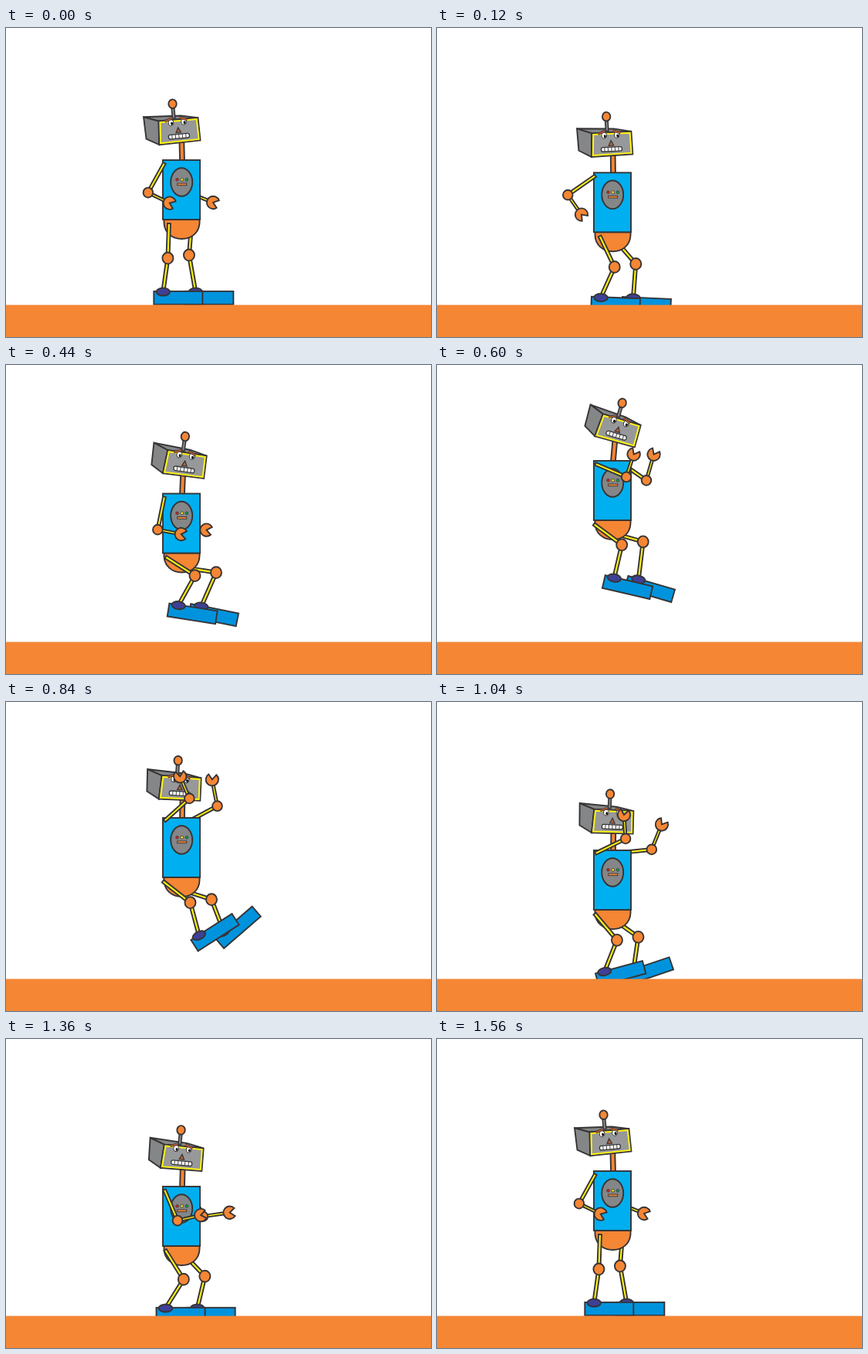
An HTML page that plays this animation: 550x400 px, repeating every 1.6 s.

```html
<!DOCTYPE html>
<html lang="en">
<head>
<meta charset="utf-8">
<title>Jumping robot</title>
<style>
html, body { margin: 0; width: 100%; height: 100%; overflow: hidden; background: #fff; }
svg { display: block; width: 550px; height: 400px; }
</style>
</head>
<body>
<svg viewBox="0 0 550 400" stroke="#373435" stroke-width="1.9">
  <g id="robot"></g>
  <rect y="358.5" width="550" height="42" fill="#f58634" stroke="none"/>
</svg>
<script>
const STEP = 40, COUNT = 40, FLOOR = 349;
const ORANGE = '#f58634', YELLOW = '#fff212', SHOE = '#0093dd', NAVY = '#3e4095', GREY = '#848688';
const rad = Math.PI / 180;

// Key poses; angles in degrees, pairs are upper and lower bone.
const poses = [
  { at: 0, head: 223.8, tilt: -5, hip: 211, leg: [92, 98], shoe: 0, arm: [119, 26], far: [95, 22] },
  { at: 7, head: 229.2, tilt: 0, hip: 210, leg: [28.5, 135], shoe: 5, arm: [180, 94], far: [186, 99] },
  { at: 15, head: 234.5, tilt: 16.5, hip: 203, leg: [36.5, 103], shoe: 13, arm: [23, -72], far: [35, -74] },
  { at: 21, head: 225.7, tilt: 3.5, hip: 203, leg: [38, 75], shoe: -32.7, arm: [-42, -113], far: [-28, -101] },
  { at: 26, head: 227.7, tilt: 2.5, hip: 204, leg: [50, 111.5], shoe: -15, arm: [-26, -94], far: [-6, -68] },
  { at: 34, head: 228.3, tilt: 5.5, hip: 206, leg: [58, 122], shoe: 0, arm: [67, -13], far: [66, -8] }];
poses.push({ ...poses[0], at: COUNT - 1 });

// Height of the torso top: crouch, leap, fall, crouch, rise
const lift = [[0, 171], [7, 209], [15, 124], [17, 105], [21, 150], [26, 192], [29, 204], [34, 191], [39, 171]]
  .map(([at, top]) => ({ at, top }));

const mix = (a, b, k) => Array.isArray(a) ? a.map((v, i) => mix(v, b[i], k)) : a + (b - a) * k;

function between(keys, f) {
  const i = Math.max(1, keys.findIndex(p => p.at >= f));
  const a = keys[i - 1], b = keys[i], k = (f - a.at) / (b.at - a.at);
  return Object.fromEntries(Object.keys(a).map(n => [n, mix(a[n], b[n], k)]));
}

const reach = ([x, y], a, len) => [x + len * Math.cos(a * rad), y + len * Math.sin(a * rad)];
const place = ([x, y], a, body) => `<g transform="translate(${x} ${y}) rotate(${a})">${body}</g>`;
const rect = (x, y, w, h, fill, more = '') =>
  `<rect x="${x}" y="${y}" width="${w}" height="${h}" fill="${fill}" ${more}/>`;
const oval = (x, y, rx, ry, fill, more = '') =>
  `<ellipse cx="${x}" cy="${y}" rx="${rx}" ry="${ry}" fill="${fill}" ${more}/>`;
const path = (d, fill, more = '') => `<path d="${d}" fill="${fill}" ${more}/>`;

function bone(p, q, w) {
  const dx = q[0] - p[0], dy = q[1] - p[1];
  return place(p, Math.atan2(dy, dx) / rad, rect(0, -w / 2, Math.hypot(dx, dy), w, YELLOW));
}

function leg(hip, knee, foot, tilt, heel) {
  return bone(hip, knee, 4) + bone(knee, foot, 4) + oval(...knee, 7, 7.4, ORANGE) +
    place(foot, tilt, rect(-heel, -0.7, 63, 17, SHOE)) +
    place(foot, tilt * 0.8, oval(0, 0, 8.8, 5, NAVY));
}

// The far leg follows the near one; the feet close up as the knees bend.
function legs(p, top) {
  const hip = [p.hip, top + 82], knee = reach(hip, p.leg[0], 45), foot = reach(knee, p.leg[1], 44);
  const sink = Math.max(0, foot[1] - FLOOR);
  foot[1] -= sink;
  knee[1] -= sink / 2;
  const spread = 42 - Math.max(0, 60 - p.leg[0]) * 0.45;
  return {
    near: leg(hip, knee, foot, p.shoe, 12),
    far: leg([239, top + 97], [knee[0] + 27.5, knee[1] - 4],
      [foot[0] + spread, foot[1] + p.shoe * 0.15], p.shoe * 1.25, 14)
  };
}

function arm(shoulder, [a, b], upper, lower) {
  const elbow = reach(shoulder, a, upper), hand = reach(elbow, b, lower), r = 8.2;
  const claw = `M0 0L${reach([0, 0], 38, r)}A${r} ${r} 0 1 1 ${reach([0, 0], -38, r)}Z`;
  return bone(shoulder, elbow, 3.8) + bone(elbow, hand, 3.2) +
    oval(...elbow, 6.3, 6.4, ORANGE) + place(hand, b * 0.85, path(claw, ORANGE));
}

function torso(top) {
  const lights = ['#da251d', YELLOW, '#00a859'].map((c, i) =>
    oval(221.5 + i * 6.2, 25.3, 1.8, 1.8, c, 'stroke-width=".8"')).join('');
  return place([0, top], 0,
    path('M204.5 77V81C205 94 215 102 227.5 102S250 94 250.5 81V77Z', ORANGE) +
    rect(203, 0, 48, 77, '#00afef') + oval(227.2, 28.5, 14, 18.3, GREY) + lights +
    rect(221.7, 30, 12, 2.7, ORANGE, 'stroke-width=".9"'));
}

function eye(x) {
  return oval(x, -11.5, 3.3, 4, '#fff', 'stroke-width="1"') +
    oval(x + 1, -10.3, 1.5, 2, '#111', 'stroke="none"');
}

function brow(d) {
  return path(d, 'none', 'stroke-width="3.2"') +
    path(d, 'none', 'stroke="#d8602c" stroke-width="1.4"');
}

function head(pos, tilt) {
  let teeth = '';
  for (let i = 1; i < 6; i++) teeth += `M${-14 + i * 4.5} 4V9.6`;
  return place(pos, tilt,
    path('M-44 -22L4 -19.5L26 -15H-25Z', GREY) +
    rect(-7, -32, 3.6, 15, GREY, 'stroke-width="1.5"') +
    oval(-5.2, -35.7, 5.2, 5.8, ORANGE) +
    path('M-44 -22L-25 -15L-27 15.5L-43 6.5Z', GREY) +
    path('M-25 -15H26L26.5 14.5L-27 15.5Z', '#96989a') +
    path('M-23.2 -13.2H24.2L24.8 12.8L-25 13.7Z', 'none', `stroke="${YELLOW}" stroke-width="2"`) +
    eye(-9.3) + eye(7.2) + brow('M-17 -13.8L-8 -17.2') + brow('M2 -17.2L12 -13.8') +
    path('M-.8 -4.5L-4 2H2.5Z', '#b5622f', 'stroke-width="1.2"') +
    rect(-14, 4, 27, 5.6, '#fff', 'rx="2.5" stroke-width="1.3"') +
    path(teeth, 'none', 'stroke-width=".9"'));
}

const robot = document.getElementById('robot');

function draw(f) {
  const p = between(poses, f), { top } = between(lift, f), { near, far } = legs(p, top);
  robot.innerHTML =
    arm([239, top + 3], p.far, 39, 35) + far +
    place([228, top], p.tilt * 0.3, rect(-2.9, -28, 5.8, 30, ORANGE)) + torso(top) +
    head([p.head, top * 1.03 - 42.8], p.tilt) +
    near + arm([205, top + 4], p.arm, 43.5, 31);
}

const start = performance.now();
let shown = 0;
function tick(now) {
  const f = Math.floor(Math.max(0, now - start) / STEP) % COUNT;
  if (f !== shown) draw(shown = f);
  requestAnimationFrame(tick);
}
draw(0);
requestAnimationFrame(tick);
</script>
</body>
</html>
```
